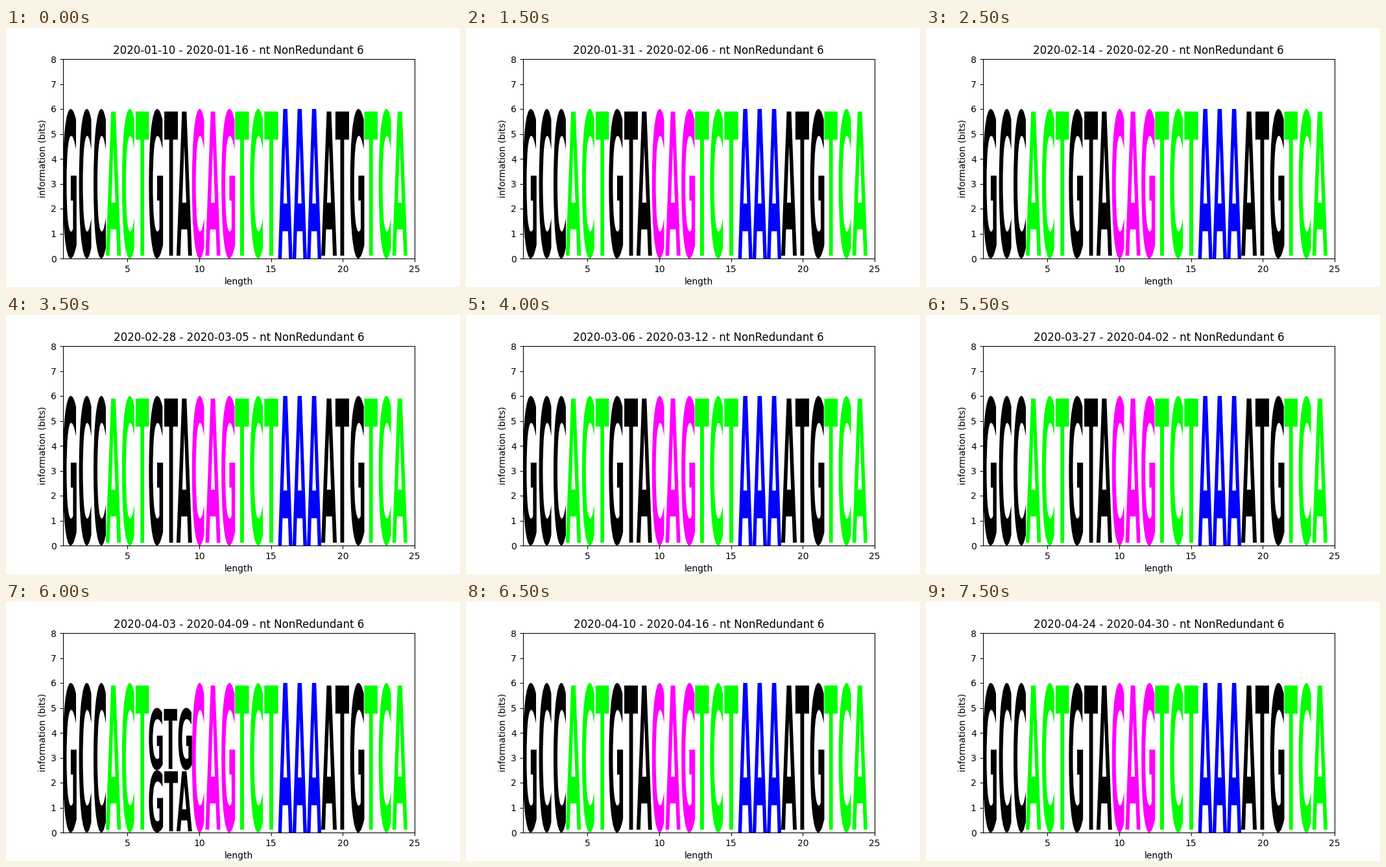
A matplotlib script that plays this animation: 700x400 px, repeating every 8000 ms.

```python
import matplotlib.pyplot as plt
import numpy as np
from matplotlib.animation import FuncAnimation
from matplotlib.patches import PathPatch
from matplotlib.textpath import TextPath
from matplotlib.transforms import Affine2D

FRAMES, INTERVAL = 16, 500
SPLIT_WEEK = 12          # the one week with two variants of the third codon
START = np.datetime64("2020-01-10")
FONT = {"family": "DejaVu Sans", "weight": "bold"}

BLACK, GREEN, BLUE, PINK = "#000000", "#00ff00", "#0000ff", "#ff00ff"
CODONS = [("GCC", BLACK), ("ACT", GREEN), ("GTA", BLACK), ("CAG", PINK),
          ("TCT", GREEN), ("AAA", BLUE), ("ATG", BLACK), ("TCA", GREEN)]

plt.rcParams["font.family"] = "DejaVu Sans"
fig, ax = plt.subplots(figsize=(7, 4), dpi=100)


def add_codon(slot, text, color, bottom, height):
    """Stretch a codon over its three positions and the given bit range."""
    path = TextPath((0, 0), text, size=1, prop=FONT)
    box = path.get_extents()
    fit = (Affine2D()
           .translate(-box.x0, -box.y0)
           .scale(3 / box.width, height / box.height)
           .translate(0.5 + 3 * slot, bottom))
    patch = PathPatch(fit.transform_path(path), facecolor=color, linewidth=0)
    return ax.add_patch(patch)


full = [add_codon(i, text, color, 0, 6)
        for i, (text, color) in enumerate(CODONS)]
split = [add_codon(2, "GTA", BLACK, 0, 2.5),
         add_codon(2, "GTG", BLACK, 2.5, 2.5)]

ax.set(xlim=(0.5, 25), ylim=(0, 8),
       xticks=np.arange(5, 26, 5), yticks=np.arange(9),
       xlabel="length", ylabel="information (bits)")
title = ax.set_title("")


def update(week):
    first = START + 7 * week
    title.set_text(f"{first} - {first + 6} - nt NonRedundant 6")
    is_split = week == SPLIT_WEEK
    full[2].set_visible(not is_split)
    for patch in split:
        patch.set_visible(is_split)
    return [title, full[2], *split]


anim = FuncAnimation(fig, update, frames=FRAMES, interval=INTERVAL,
                     init_func=lambda: update(0), repeat=True,
                     repeat_delay=0, blit=False)
plt.show()
```
